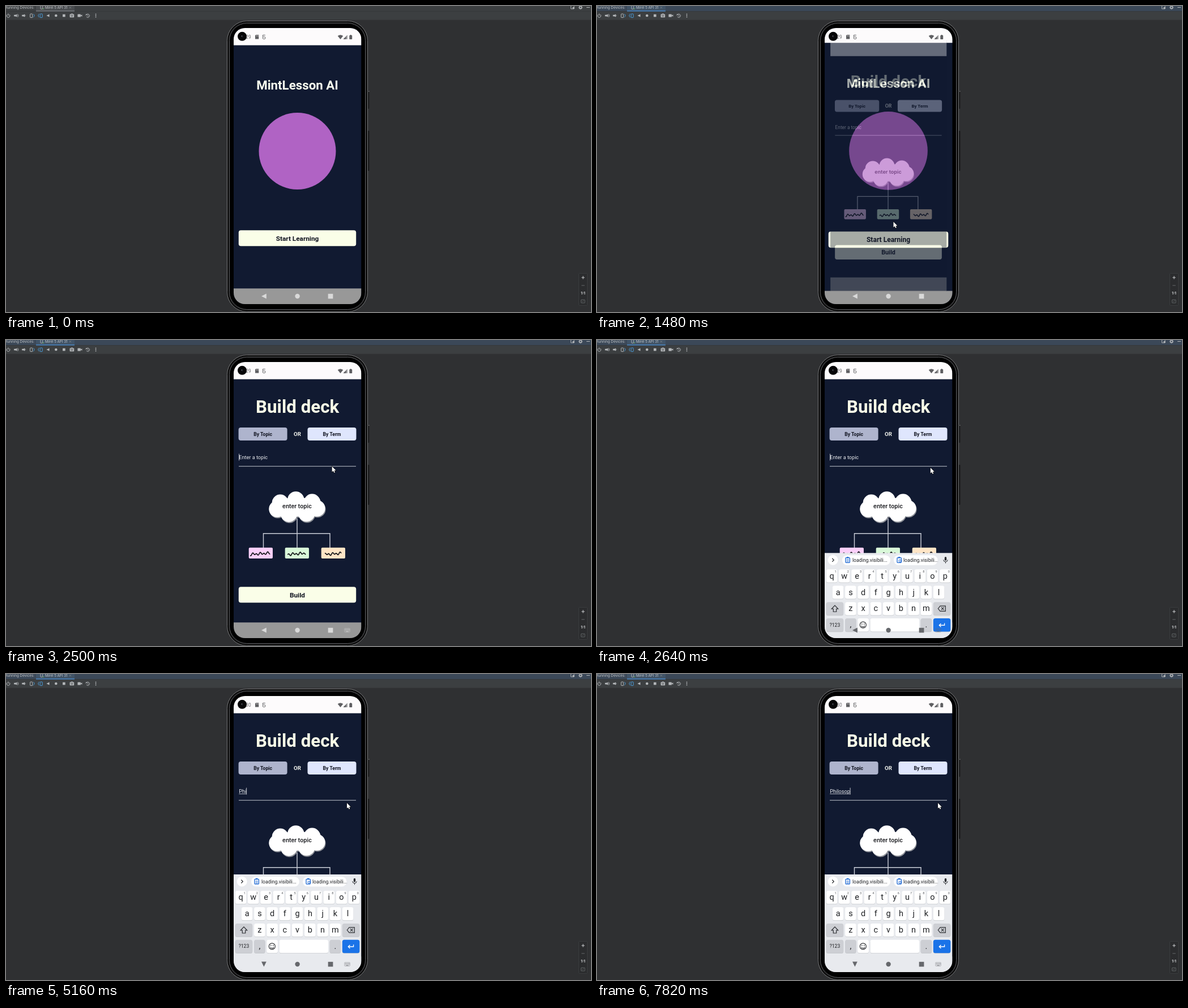
Recreate the animation shown at these times as an HTML page with a canvas. Size 1033 px wide and 542 px high, loop 8000 ms.

```html
<!DOCTYPE html>
<html lang="en">
<head>
<meta charset="utf-8">
<title>Study app demo</title>
<style>
html, body { margin: 0; width: 100%; height: 100%; overflow: hidden; background: #2f3032; }
canvas { display: block; width: 100vw; height: 100vh; }
</style>
</head>
<body>
<canvas id="stage" width="1033" height="542"></canvas>
<script>
const stage = document.getElementById('stage');
const layer = Object.assign(document.createElement('canvas'), { width: 1033, height: 542 });
const main = stage.getContext('2d'), sheet = layer.getContext('2d');
let c = main;
const LOOP = 8000, MID = { x: 514.5, y: 283.5 };
const NAVY = '#111a31', CREAM = '#fafee8', INK = '#2b2d31';

// ---------- helpers ----------
const clamp = v => Math.max(0, Math.min(1, v));
const lerp = (a, b, k) => a + (b - a) * k;
function rect(x, y, w, h, fill) {
  c.fillStyle = fill;
  c.fillRect(x, y, w, h);
}
function box(x, y, w, h, r, fill, stroke, lw = 1) {
  c.beginPath();
  c.roundRect(x, y, w, h, r);
  if (fill) { c.fillStyle = fill; c.fill(); }
  if (stroke) { c.strokeStyle = stroke; c.lineWidth = lw; c.stroke(); }
}
function dot(x, y, r, fill) {
  c.beginPath();
  c.arc(x, y, r, 0, 7);
  c.fillStyle = fill;
  c.fill();
}
function ring(x, y, r, color, lw = 1, a = 0, b = Math.PI * 2) {
  c.beginPath();
  c.arc(x, y, r, a, b);
  c.strokeStyle = color;
  c.lineWidth = lw;
  c.stroke();
}
function path(pts, close) {
  c.beginPath();
  for (let i = 0; i < pts.length; i += 2) c.lineTo(pts[i], pts[i + 1]);
  if (close) c.closePath();
}
function poly(pts, fill) {
  path(pts, true);
  c.fillStyle = fill;
  c.fill();
}
function line(pts, color, lw = 1, close) {
  path(pts, close);
  c.strokeStyle = color;
  c.lineWidth = lw;
  c.stroke();
}
function cross(x, y, r, color, lw) {
  line([x - r, y - r, x + r, y + r], color, lw);
  line([x + r, y - r, x - r, y + r], color, lw);
}
// triangle of size r pointing along angle a
function tri(x, y, r, a, fill) {
  const u = Math.cos(a) * r, v = Math.sin(a) * r;
  poly([x + u, y + v, x - u - v, y - v + u, x - u + v, y - v - u], fill);
}
function text(s, x, y, size, color, weight = 400, align = 'left', font = 'Roboto') {
  c.font = `${weight} ${size}px ${font}, sans-serif`;
  c.textAlign = align;
  c.fillStyle = color;
  c.fillText(s, x, y);
}
const label = (s, x, y, size, color) => text(s, x, y, size, color, 700, 'center');

function snap(t) {
  for (const a of [190, 1210, 2030])
    if (t >= a && t < a + 750) return a + Math.floor((t - a + 12) / 68.2) * 68.2;
  return t;
}
const stops = [[1210, 541, 409], [1480, 524, 383], [1690, 485, 330], [1960, 492, 258], [2500, 575, 224], [2780, 602, 228.5]];
function pointerAt(t) {
  if (t < stops[0][0]) {
    const k = 1 - clamp((t - 190) / 750);
    return [541 + 480 * k ** 2, 409 + 97 * Math.sqrt(k)];
  }
  const i = stops.findIndex(s => s[0] > t);
  if (i < 0) return stops.at(-1).slice(1);
  const [ta, xa, ya] = stops[i - 1], [tb, xb, yb] = stops[i];
  const k = (t - ta) / (tb - ta);
  return [lerp(xa, xb, k), lerp(ya, yb, k)];
}
const FOCUS = 2370, BLINK = 465;
const keyTimes = [3640, 3970, 4230, 6490, 6960, 7550, 7620, 7820];
function typedAt(t) {
  const past = keyTimes.filter(k => k <= t);
  const since = t - (past.at(-1) ?? FOCUS);
  return { word: 'Philosophy'.slice(0, past.length), caret: since >= 0 && Math.floor(since / BLINK) % 2 === 0 };
}

// ---------- desktop window ----------
function toolbar() {
  const ic = '#b4b7ba', blue = '#4a9bd8', y = 17;
  const at = i => 4 + 14.05 * i;
  ring(at(0), y + .3, 2.9, ic, 1, -.9, 4.05);
  line([at(0), 13.4, at(0), y], ic);
  for (const i of [1, 2]) {
    rect(at(i) - 4, y - 1.3, 2.4, 2.6, ic);
    tri(at(i) - 1.5, y, 2.4, Math.PI, ic);
    for (let w = 0; w <= 2 - i; w++) ring(at(i), y, 2 + w * 1.7, ic, .9, -.9, .9);
  }
  box(at(3) - 3.5, 14, 4, 6.5, .6, null, ic);
  ring(at(3) + .5, y, 3.3, blue, 1, -1.1, 1.2);
  box(at(4), 14, 4, 6.5, .6, null, blue);
  ring(at(4), y, 3.3, blue, 1, 2, 4.3);
  tri(at(5) - .3, y, 2.6, Math.PI, ic);
  dot(at(6), y, 2.3, ic);
  rect(at(7) - 2.3, y - 2.3, 4.6, 4.6, ic);
  box(at(8) - 3.8, y - 2.6, 7.6, 5.8, .8, ic);
  rect(at(8) - 1.7, y - 3.5, 3.4, 1.4, ic);
  ring(at(8), y + .2, 1.5, '#3c3f41', .8);
  box(at(9) - 4, y - 2.5, 5.4, 5, .6, ic);
  tri(at(9) + 2.2, y, 1.8, Math.PI, ic);
  ring(at(10), y + .2, 3, ic, 1, -2.6, 2.6);
  line([at(10), y - 1.6, at(10), y + .4, at(10) + 1.5, y + 1.2], ic, .8);
  tri(at(10) - 3, y - 1.2, 1.4, 2.3, ic);
  for (const d of [-2.6, 0, 2.6]) dot(at(11), y + d, .9, ic);
}
function windowChrome(active) {
  const ic = '#b4b7ba';
  rect(0, 0, 1033, 542, '#2f3032');
  rect(0, 0, 1033, 25, '#3c3f41');
  rect(0, 0, 1033, 9, active ? '#3b4858' : '#3c3f41');
  for (const y of [9, 24.5]) rect(0, y, 1033, .7, '#333537');
  rect(53, 0, 68, 8, active ? '#415468' : '#4a4d50');
  rect(53, 8, 68, 1.5, active ? '#4a88c7' : '#777b80');
  text('Running Devices:', -1.5, 5.2, 6.3, '#c3c6c9', 400, 'left', 'Inter');
  text('Mirel 5 API 31', 69, 5.2, 6.2, '#c3c6c9', 400, 'left', 'Inter');
  box(61, -2, 3.6, 7.4, .8, null, ic, .9);
  dot(66, 5, 1.1, '#5fa35f');
  cross(113.4, 2.8, 1.6, '#85898c', .7);
  box(997.5, -1, 5.5, 6, 0, null, ic, .9);
  rect(1000.5, 2, 3, 3, ic);
  rect(1025, 2, 6, 1, ic);
  ring(1014.5, 2.5, 2.1, ic, 1.5);
  for (let i = 0; i < 8; i++) ring(1014.5, 2.5, 3.2, ic, 1, i * Math.PI / 4 - .16, i * Math.PI / 4 + .16);
  toolbar();

  box(1011.5, 473.5, 15, 57, 1, '#2b2c2e', '#3a3c3e');
  rect(1016.3, 480.5, 5.4, 1, '#d0d2d4');
  rect(1018.5, 478.3, 1, 5.4, '#d0d2d4');
  rect(1016.3, 494.5, 5.4, 1, '#66696b');
  text('1:1', 1019, 511.3, 6.6, '#d0d2d4', 700, 'center', 'Inter');
  box(1015.5, 520.3, 6.6, 5.6, .5, null, '#66696b', .9);
  line([1017, 524, 1020.5, 522], '#66696b', .7);
}
function phoneBody() {
  box(638.5, 150, 2.8, 32, 1, '#18191a');
  box(638.5, 221, 2.8, 71, 1, '#141516');
  rect(640, 150.5, 1.3, 1.3, '#999');
  const shell = (inset, fill, edge) =>
    box(390.5 + inset, 26.5 + inset, 248 - 2 * inset, 515 - 2 * inset, 35 - inset, fill, edge);
  shell(0, '#101010', '#77787a');
  shell(1.5, '#1c1c1d', '#000');
  shell(4, '#000', '#56575a');
}

// ---------- app pages ----------
function pageBase() {
  rect(402, 39, 225.5, 489, NAVY);
  rect(402, 39, 225.5, 30.5, '#fdfbfc');
  rect(402, 500.3, 225.5, 27.7, '#989898');
}
function wideButton(s, y) {
  box(410.8, y, 207.4, 28, 4, CREAM);
  label(s, 514.5, y + 18.4, 11.8, '#10131f');
}
function homePage() {
  pageBase();
  label('MintLesson AI', 514.5, 148, 22.3, '#fbfff0');
  dot(514.5, 257, 68, '#b063c4');
  wideButton('Start Learning', 397.3);
}
// puffs spaced evenly round an ellipse
function cloud(dx, dy, fill) {
  c.beginPath();
  c.ellipse(513.5 + dx, 296 + dy, 38, 17, 0, 0, 7);
  c.fillStyle = fill;
  c.fill();
  for (let i = 0; i < 7; i++) {
    const a = i * Math.PI * 2 / 7 - 1.62;
    dot(513.5 + dx + 36 * Math.cos(a), 296 + dy + 13 * Math.sin(a), 14.6, fill);
  }
}
function scribble(x, y, w, phase) {
  c.beginPath();
  for (let i = 0; i <= w; i++)
    c.lineTo(x + i, y - i * .07 + 1.6 * Math.sin(i * .95 + phase) + 1.1 * Math.sin(i * .5 + phase * 2));
  c.strokeStyle = '#15161a';
  c.lineWidth = 1.7;
  c.lineCap = c.lineJoin = 'round';
  c.stroke();
  c.lineCap = 'butt';
  c.lineJoin = 'miter';
}
function mindMap() {
  const wire = '#ccd0da';
  line([514, 316, 514, 369], wire, 1.4);
  line([454.5, 369, 454.5, 342.7, 572, 342.7, 572, 369], wire, 1.4);
  cloud(1, 1.7, '#8c8f96');
  cloud(0, -.2, '#fff');
  text('enter topic', 514, 298.4, 10, '#17181c', 600, 'center', 'Inter');
  ['#fbd0fa', '#d9f8d9', '#ffe5c6'].forEach((fill, i) => {
    const x = 428.7 + 64 * i;
    box(x, 367.7, 42.3, 19.3, 2, fill);
    scribble(x + 3 + 2 * i, 379.8, 34 - 3 * i, 1 + i * 2);
  });
}
function choice(s, x, fill) {
  box(x, 155, 86, 23, 4, fill);
  label(s, x + 43, 169.8, 8.6, '#10131f');
}
function deckPage(t) {
  pageBase();
  label('Build deck', 514.7, 129.2, 31.3, CREAM);
  choice('By Topic', 410.6, '#aeb4cd');
  choice('By Term', 532.5, '#dfe6fd');
  label('OR', 514.5, 170, 9.7, '#f2f4ee');
  const { word, caret } = typedAt(t);
  text(word || 'Enter a topic', 411.3, 211.3, 9.15, '#e9ebef');
  const w = c.measureText(word).width;
  rect(411.3, 211.9, w, .8, '#d5d8de');
  if (caret) rect(411.2 + w, 201.5, .9, 12, '#d5d8de');
  rect(411, 223.2, 207, 1, '#bfc4cd');
  mindMap();
  wideButton('Build', 437.3);
}
function zoomed(scale, draw) {
  c.save();
  c.translate(MID.x, MID.y);
  c.scale(scale, scale);
  c.translate(-MID.x, -MID.y);
  draw();
  c.restore();
}
// draws on a separate sheet so that the whole page fades as one
function faded(alpha, draw) {
  c = sheet;
  c.clearRect(0, 0, 1033, 542);
  draw();
  c = main;
  c.globalAlpha = alpha;
  c.drawImage(layer, 0, 0);
  c.globalAlpha = 1;
}

// ---------- keyboard ----------
const PITCH = 22.25, KEY_W = 19.6, WIDE = 30.5, GRAY = '#cdcfd4';
const keyX = i => 404.7 + PITCH * i;
const rowY = r => 384 + 28.95 * r;
function key(x, row, w, s, fill = '#fff', size = 14.5) {
  const y = rowY(row);
  box(x, y + .8, w, 23.3, 3.5, '#c3c6ca');
  box(x, y, w, 23.3, 3.5, fill);
  text(s, x + w / 2, y + 11.7 + size * .32, size, '#1f2124', 400, 'center');
}
function letters(s, row, from) {
  [...s].forEach((ch, i) => key(keyX(i + from), row, KEY_W, ch));
}
function chip(x, w, tagged) {
  const blue = '#1a66d2';
  box(x, 359, w, 17.5, 8.7, '#fff');
  c.save();
  c.beginPath();
  c.rect(x, 355, w, 25);
  c.clip();
  box(x + 6, 363.3, 7.4, 8.8, 1, null, blue, 1.3);
  rect(x + 8, 361.9, 3.4, 2.2, blue);
  if (tagged) ring(x + 11, 369, 2, blue);
  else for (let i = 0; i < 3; i++) rect(x + 7.7, 366 + 2 * i, 4, .8, blue);
  text('loading.visibili...', x + (tagged ? 17 : 18), 371, 8.7, '#202226');
  c.restore();
}
function keyboard() {
  rect(402, 355, 225.5, 173, '#e8eaee');
  dot(416.7, 367.5, 9, '#fff');
  line([415.3, 364.5, 418.3, 367.5, 415.3, 370.5], INK, 1.2);
  chip(433, 85, false);
  chip(524, 77.5, true);
  box(613.8, 361.8, 3.4, 6.8, 1.7, INK);
  ring(615.5, 367, 3.7, INK, 1, 0, Math.PI);
  rect(615, 370.7, 1, 2.6, INK);

  letters('qwertyuiop', 0, 0);
  for (let i = 0; i < 10; i++) text((i + 1) % 10, keyX(i) + 16.3, 390.2, 5.6, '#55585d', 400, 'center');
  letters('asdfghjkl', 1, .5);
  letters('zxcvbnm', 2, 1.5);
  for (const i of [0, 8.5]) key(keyX(i), 2, WIDE, '', GRAY);
  key(keyX(0), 3, WIDE, '?123', GRAY, 8.6);
  key(keyX(1.5), 3, KEY_W, ',', GRAY);
  key(keyX(2.5), 3, KEY_W, '');
  key(keyX(3.5), 3, 86.5, '');
  key(keyX(7.5), 3, KEY_W, '.', GRAY);
  key(keyX(8.5), 3, WIDE, '', '#1a73e8');

  line([420, 447.8, 425.7, 454, 422.7, 454, 422.7, 459, 417.3, 459, 417.3, 454, 414.3, 454], INK, 1.2, true);
  line([602.3, 453.5, 606, 448.8, 615.3, 448.8, 615.3, 458.2, 606, 458.2], INK, 1.2, true);
  cross(610.3, 453.5, 2.3, INK, 1.1);
  ring(469.8, 482.4, 5.5, INK, 1.2);
  ring(469.8, 483, 2.8, INK, 1.1, .2, 2.95);
  for (const d of [-2, 2]) dot(469.8 + d, 480.8, .9, INK);
  line([613.6, 479.3, 613.6, 483, 604.5, 483], '#fff', 1.3);
  line([607.4, 480, 604.3, 483, 607.4, 486], '#fff', 1.3);
}

// ---------- system bars ----------
function statusIcons(t) {
  const ic = '#5f5f62';
  text(t < 4500 ? '9:29' : '9:30', 432.6, 57.9, 8.3, '#6d6d70', 400, 'right');
  dot(417, 53.8, 8, '#050506');
  dot(417, 53.8, 2.2, '#15161b');
  dot(416.3, 53.2, .7, '#8a8a90');
  box(440, 51, 6.3, 7.4, [2, 0, 0, 0], ic);
  for (let i = 0; i < 3; i++) rect(442 + 1.5 * i, 52, .6, 1.6, '#fdfbfc');
  line([457.8, 51.6, 453.4, 51.6, 453.4, 54.7], ic);
  box(453.4, 54.7, 4.4, 3.6, 1, null, ic);
  c.beginPath();
  c.moveTo(590.5, 59);
  c.arc(590.5, 59, 7.6, -2.25, -.89);
  c.fillStyle = ic;
  c.fill();
  poly([595.6, 58.8, 602.8, 51.2, 602.8, 58.8], '#8d8d90');
  poly([595.6, 58.8, 600, 54.2, 600, 58.8], ic);
  box(606.3, 52, 4.9, 7, .7, ic);
  rect(607.7, 51, 2.1, 1.2, ic);
}
function navIcons(t, dark) {
  const ic = dark ? '#66686c' : '#d9d9d9';
  tri(455.4, 514, 4.4, t < 2850 ? Math.PI : Math.PI / 2, ic);
  dot(514.6, 514, 4.2, ic);
  rect(568.7, 509.8, 8.7, 8.6, ic);
  if (t < FOCUS) return;
  for (let i = 0; i < 10; i++) rect(598.9 + i % 5 * 1.7, 512 + (i > 4) * 1.8, .9, .9, ic);
  rect(600.3, 515.7, 4.5, .9, ic);
  c.globalAlpha = .6;
  box(597.8, 510.9, 9.4, 6.3, .6, null, ic, .7);
  c.globalAlpha = 1;
}
function arrow(x, y) {
  c.save();
  c.translate(x, y);
  const shape = [0, 0, 0, 9.6, 2.2, 7.7, 3.7, 11, 5.3, 10.3, 3.9, 7.1, 6.8, 7];
  line(shape, '#0a0a0a', 1.1, true);
  poly(shape, '#fff');
  c.restore();
}

function render(t) {
  const s = snap(t);
  windowChrome(t >= 860);
  phoneBody();
  c.save();
  c.beginPath();
  c.roundRect(402, 39, 225.5, 489, 20);
  c.clip();
  const open = 1 - Math.exp(-Math.max(0, s - 1440) / 84);
  const alpha = clamp((s - 1440) / 118);
  if (alpha < 1) zoomed(1 + .05 * open, homePage);
  if (alpha > 0) faded(alpha, () => zoomed(.85 + .15 * open, () => deckPage(t)));
  const rise = clamp((s - 2520) / 250);
  if (rise > 0) {
    c.save();
    c.translate(0, 173 * (1 - rise) ** 3);
    keyboard();
    c.restore();
  }
  statusIcons(t);
  navIcons(t, rise > .2);
  c.restore();
  if (t >= 190) arrow(...pointerAt(s));
}

const start = performance.now();
function tick() {
  render((performance.now() - start) % LOOP);
  requestAnimationFrame(tick);
}
tick();
</script>
</body>
</html>
```
